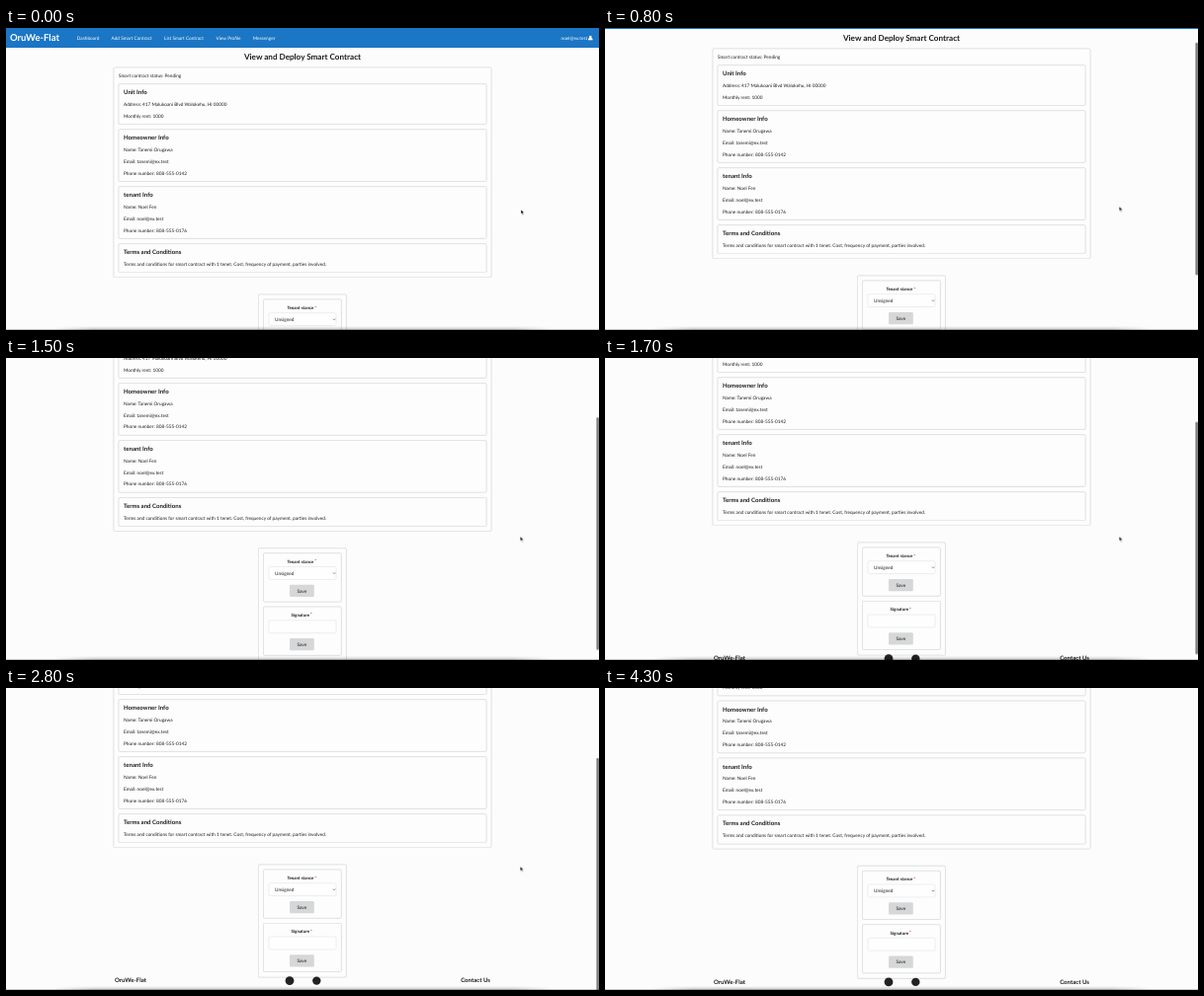
Write an HTML page that moves like this. It is 600 by 306 pixels and loops after 4.8 s.

```html
<!DOCTYPE html>
<html lang="en">
<head>
<meta charset="utf-8">
<title>View and Deploy Smart Contract</title>
<style>
  @property --y { syntax: "<number>"; inherits: true; initial-value: 0; }

  html, body { margin: 0; width: 100%; height: 100%; overflow: hidden; background: #fcfcfc; }
  svg { display: block; width: 600px; height: 306px; animation: scroll 4.8s step-end infinite; }
  text { font: 4.745px Lato, sans-serif; fill: #1c1c1d; text-rendering: geometricPrecision; }

  .page { transform: translateY(calc(var(--y) * -1px)); }
  .nav text { fill: #fff; }
  .nav .brand { font-size: 9.49px; font-weight: 700; }
  .title { font-size: 8.135px; font-weight: 700; }
  .head { font-size: 6.07px; font-weight: 700; }
  .label { font-size: 4.4px; font-weight: 700; }
  .star { fill: #db2828; }
  .save { font-weight: 700; fill: #484848; }
  .mid { text-anchor: middle; }

  .box { fill: #fdfdfd; stroke: #d6d6d7; stroke-width: .55; filter: drop-shadow(0 .4px .4px rgba(34, 36, 38, .16)); }
  .field { fill: #fefefe; stroke: #dcdcdd; stroke-width: .5; }
  .button { fill: #d6d7d8; }

  .thumb { fill: #7d7d7d; transform: translateY(calc(var(--y) * .78px)); animation: fade 4.8s step-end infinite; }
  .cursor { fill: #000; stroke: #fff; stroke-width: .5; animation: point 4.8s step-end infinite; }

  @keyframes scroll {
    0% { --y: 0 }
    10.41% { --y: 1.5 }  12.5% { --y: 5 }     14.58% { --y: 12 }
    16.66% { --y: 19 }   18.75% { --y: 26 }   20.83% { --y: 33.5 }
    22.91% { --y: 41.5 } 25% { --y: 49.7 }    27.08% { --y: 60 }
    29.16% { --y: 70 }   31.25% { --y: 77.2 } 33.33% { --y: 81 }
    35.41% { --y: 83 }   39.58% { --y: 84 }   41.66% { --y: 85.7 }
    43.75% { --y: 87 }   52.08% { --y: 87.7 } 54.16% { --y: 89 }
    56.25% { --y: 90.2 } 58.33% { --y: 91 }   62.5% { --y: 90.6 }
    64.58% { --y: 90.2 } 66.66% { --y: 89.9 } 68.75%, 100% { --y: 89.7 }
  }
  @keyframes fade {
    0% { opacity: 0 }
    10.41% { opacity: 1 }
    66.66% { opacity: .75 }
    68.75% { opacity: .5 }
    70.83% { opacity: .25 }
    72.91%, 100% { opacity: 0 }
  }
  @keyframes point {
    0% { transform: translate(521px, 184px) }
    2.08% { transform: translate(520.7px, 182.5px) }
    4.16% { transform: translate(520.3px, 180.8px) }
    83.33% { transform: translate(440px, 103px) }
    85.41% { transform: translate(365px, 150px) }
    87.5% { transform: translate(299px, 241px); opacity: 1 }
    89.58%, 100% { transform: translate(299px, 241px); opacity: 0 }
  }
</style>
</head>
<body>
<svg viewBox="0 0 600 306">
  <defs>
    <linearGradient id="shade" x2="0" y2="1">
      <stop stop-opacity="0"/><stop offset="1" stop-opacity=".22"/>
    </linearGradient>
    <linearGradient id="ends">
      <stop stop-color="#000"/><stop offset=".08" stop-color="#fff"/>
      <stop offset=".92" stop-color="#fff"/><stop offset="1" stop-color="#000"/>
    </linearGradient>
    <mask id="sides"><rect x="48" y="300" width="504" height="6" fill="url(#ends)"/></mask>
  </defs>

  <g class="page">
    <g class="nav">
      <rect width="600" height="20" fill="#1b76c5"/>
      <text class="brand" x="4" y="13.2">OruWe-Flat</text>
      <text x="71.8" y="11.8">Dashboard</text>
      <text x="106.5" y="11.8">Add Smart Contract</text>
      <text x="160" y="11.8">List Smart Contract</text>
      <text x="212.5" y="11.8">View Profile</text>
      <text x="249.7" y="11.8">Messenger</text>
      <text x="588.3" y="11.8" text-anchor="end">noel@ex.test</text>
      <path fill="#fff" d="M589 12.3c0-2 1-2.2 2.3-2.2s2.3.2 2.3 2.2z"/>
      <circle cx="591.3" cy="9" r="1.3" fill="#fff"/>
    </g>

    <text class="title mid" x="300" y="32.4">View and Deploy Smart Contract</text>

    <rect class="box" x="109" y="40" width="382" height="212.7" rx="1.3"/>
    <text x="113.9" y="49.8">Smart contract status: Pending</text>

    <rect class="box" x="114" y="56.7" width="372" height="40.8" rx="1.3"/>
    <text class="head" x="119" y="67.2">Unit Info</text>
    <text x="119" y="79">Address: 417 Malukoani Blvd Walokehu, HI 00000</text>
    <text x="119" y="90.8">Monthly rent: 1000</text>

    <rect class="box" x="114" y="102.8" width="372" height="52.6" rx="1.3"/>
    <text class="head" x="119" y="113.3">Homeowner Info</text>
    <text x="119" y="125.1">Name: Tanemi Orugawa</text>
    <text x="119" y="136.9">Email: tanemi@ex.test</text>
    <text x="119" y="148.7">Phone number: 808-555-0142</text>

    <rect class="box" x="114" y="160.7" width="372" height="52.6" rx="1.3"/>
    <text class="head" x="119" y="171.3">tenant Info</text>
    <text x="119" y="183">Name: Noel Fen</text>
    <text x="119" y="194.8">Email: noel@ex.test</text>
    <text x="119" y="206.6">Phone number: 808-555-0176</text>

    <rect class="box" x="114" y="218.7" width="372" height="29" rx="1.3"/>
    <text class="head" x="119" y="229.2">Terms and Conditions</text>
    <text x="119" y="241">Terms and conditions for smart contract with 1 tenet. Cost, frequency of payment, parties involved.</text>

    <rect class="box" x="255.4" y="270" width="89" height="114" rx="1.3"/>

    <rect class="box" x="260.5" y="275" width="78.8" height="49.2" rx="1.3"/>
    <text class="label" x="284.4" y="285.2">Tenant stance<tspan class="star" dx=".9" dy="-.7">*</tspan></text>
    <rect class="field" x="266" y="288.7" width="68" height="12.9" rx="1.3"/>
    <text x="272" y="296.9">Unsigned</text>
    <path d="M331 294.6l1.1 1.2 1.1-1.2" fill="none" stroke="#333" stroke-width=".55"/>
    <rect class="button" x="287" y="307" width="24.8" height="12.3" rx="1.3"/>
    <text class="save mid" x="299.4" y="314.9">Save</text>

    <rect class="box" x="260.5" y="329.3" width="78.8" height="49.2" rx="1.3"/>
    <text class="label" x="288.6" y="339.4">Signature<tspan class="star" dx=".9" dy="-.7">*</tspan></text>
    <rect class="field" x="266" y="343" width="68" height="12.9" rx="1.3"/>
    <rect class="button" x="287" y="361.2" width="24.8" height="12.3" rx="1.3"/>
    <text class="save mid" x="299.4" y="369.1">Save</text>

    <text class="head" x="110" y="389.4">OruWe-Flat</text>
    <circle cx="287" cy="387.6" r="4.4" fill="#222"/>
    <circle cx="314.3" cy="387.6" r="4.2" fill="#222"/>
    <text class="head" x="490" y="389.4" text-anchor="end">Contact Us</text>
  </g>

  <rect class="thumb" x="597.4" width="2.5" height="235.5" rx="1.2"/>
  <rect y="302" width="600" height="4" fill="url(#shade)" mask="url(#sides)"/>
  <rect y="305.2" width="600" height=".8" fill="#000" opacity=".25"/>
  <path class="cursor" d="M0 0v4.6l1.1-1 .8 1.8.8-.4-.8-1.7h1.5z"/>
</svg>
</body>
</html>
```
